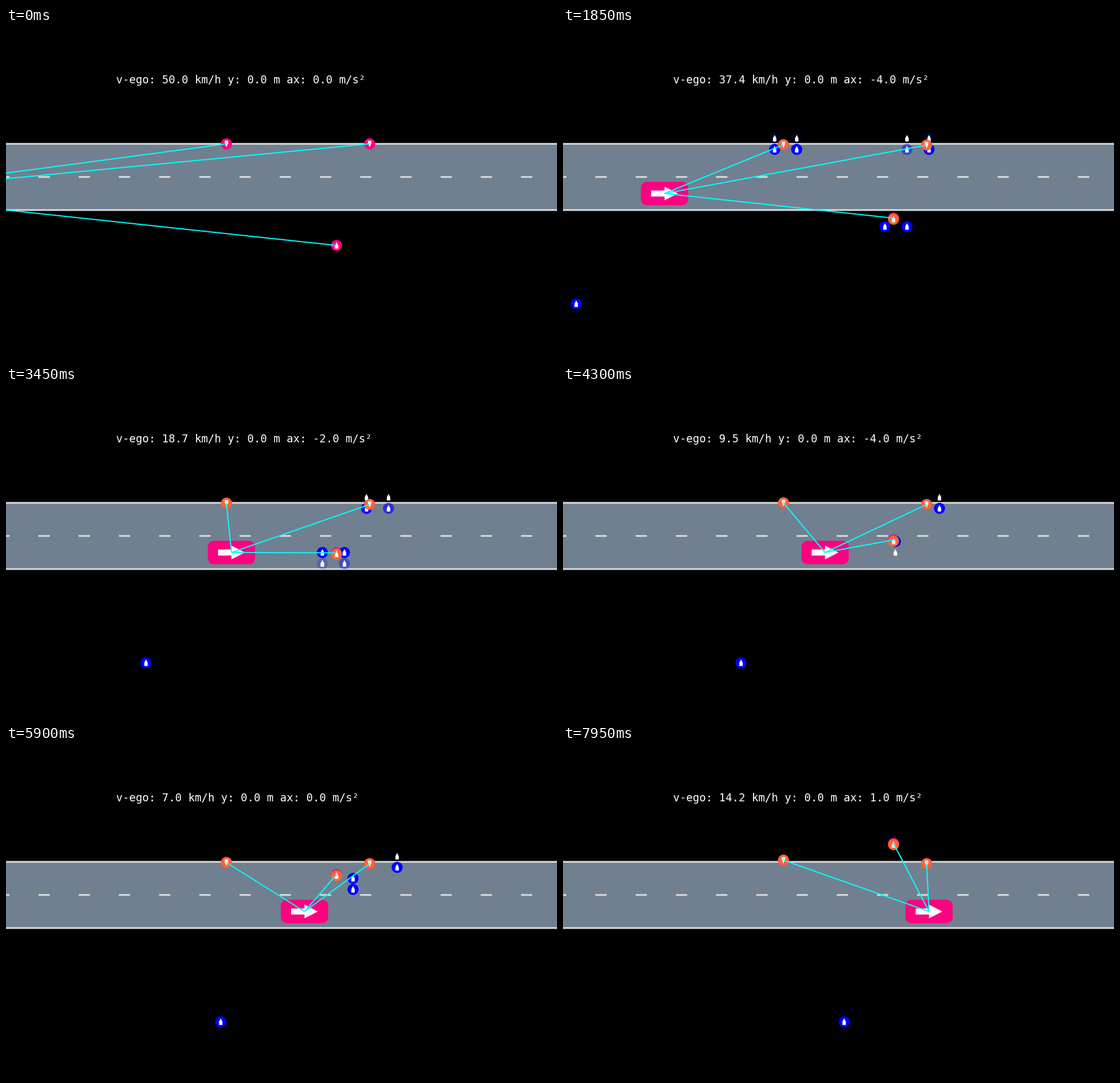
Write a matplotlib script that moves like this. It is 966x580 px and loops after 8000 ms.

```python
import numpy as np
import matplotlib.pyplot as plt
from matplotlib.animation import FuncAnimation
from matplotlib.patches import Circle, FancyBboxPatch, Polygon, Rectangle

W, H, DPI = 966, 580, 100
PX = 72 / DPI            # points per pixel
S = 19.33                # pixels per metre
DT = 0.05
FRAMES = 160
EGO_Y = 290
PINK, ORANGE, BLUE = "#ff0080", "#ff6a33", "#0000ff"
CYAN, PAINT, ASPHALT = "#00ffff", "#dcdcdc", "#708090"

# Driving phases of the car: (acceleration in m/s^2, steps)
PHASES = [(0, 16), (-2, 5), (-4, 15), (-8, 3), (-4, 8), (0, 4), (-2, 1),
          (-4, 7), (-2, 16), (-1, 1), (-4, 10), (0, 4), (-1, 10),
          (0, 18), (1, 40)]
ACC = np.concatenate([[0.0]] + [np.full(n, float(a)) for a, n in PHASES])
VEL = 50 / 3.6 + np.cumsum(ACC) * DT
STEP = (VEL + ACC * DT) * DT * S
POS = -270 + np.cumsum(STEP) - STEP[0]

fig = plt.figure(figsize=(W / DPI, H / DPI), dpi=DPI, facecolor="black")
ax = fig.add_axes([0, 0, 1, 1])
ax.set_xlim(0, W)
ax.set_ylim(H, 0)
ax.axis("off")
live = []


def stroke(xs, ys, color, width, z, cap="butt"):
    return ax.plot(xs, ys, color=color, lw=width * PX, zorder=z,
                   solid_capstyle=cap, snap=False)


def add(patch, z):
    patch.set_zorder(z)
    live.append(ax.add_patch(patch))


def disc(x, y, color, z, alpha=1.0):
    add(Circle((x, y), 9.7, fc=color, lw=0, alpha=alpha), z)


def shape(x, y, pts, z, alpha=1.0):
    add(Polygon([(x + a, y + b) for a, b in pts], fc="white", lw=0,
                alpha=alpha), z)


def pointer(x, y, z, up=1, tip=3.0, alpha=1.0):
    half = [(3, 5.5), (3, -0.3), (tip, -0.3), (0, -6)]
    pts = half + [(-a, b) for a, b in half[::-1]]
    shape(x, y, [(a, up * b) for a, b in pts], z, alpha)


def cell(x, y, alpha):
    if alpha > 0.02:
        disc(x, y, BLUE, 4, min(1, alpha))
    pointer(x, y, 4.1)


def draw_ego(x):
    add(FancyBboxPatch((x - 29.5, EGO_Y - 8.5), 59, 17,
                       boxstyle="round,pad=12", fc=PINK, lw=0), 2)
    half = [(-23.5, 5.3), (0, 5.3), (0, 12), (23.5, 0)]
    shape(x, EGO_Y, half + [(a, -b) for a, b in half[::-1]], 2.1)


def draw_cells(x, y, grid, t, crossing):
    """Occupied cells (2 m by 1 m) around a walker, in the frame of the car."""
    slow = t > 4
    drift = max(0, 8 * (t - 4.3))
    u = (x + drift - grid) / S / 2 - 0.25
    v = (EGO_Y - y) / S
    c, r = int(np.floor(u)), int(np.floor(v))
    fx, fy = u - c, v - r
    cols = [(c + 1, 1)] if slow else [(c, 1 - fx), (c + 1, fx)]
    rows = [(r, 1 - fy), (r + 1, fy)]
    fade = 1 if crossing else np.exp(-(t / 1.5) ** 4)

    for n, wx in cols:
        cx = grid + (2 * n + 0.5) * S
        for (m, wy), gain in zip(rows, (1, fade)):
            if wy > 0.2:
                cell(cx, EGO_Y - m * S, 10 * wx * (wy - 0.2) * gain)
    if crossing and 2 < t < 5:       # trail behind the crossing walker
        cell(grid + (2 * cols[0][0] + 0.5) * S,
             EGO_Y - (round(v) - 1) * S, 0)


def walkers(t, k):
    """Positions (x, y, heading up) of the three walkers."""
    sway = 1.6 * np.sin(np.pi * t / 4.4) ** 2 - 1.75 * max(0, t - 6)
    settle = 3.2 * (1 - np.exp(-t / 1.6))
    return [(386.5, 203 + sway, -1), (637.5, 203 + settle, -1),
            (579.5, 381 - 26.6 * k * DT, 1)]


def draw(i):
    while live:
        live.pop().remove()
    k = max(0, i - 1)
    t = i * DT
    ego, grid = POS[k], POS[max(0, k - 1)]
    label.set_text(f"v-ego: {VEL[k] * 3.6:.1f} km/h y: 0.0 m "
                   f"ax: {ACC[k]:.1f} m/s²")
    draw_ego(ego)
    if k:
        cell(grid - 7.5 * S, EGO_Y + 10 * S, 1)

    for x, y, up in walkers(t, k):
        crossing = up > 0
        disc(x, y, PINK, 3)
        pointer(x, y, 3.1, up, 2.3)
        if k:
            lag = 8 - 7.5 * np.cos(2 * np.pi * (t - 0.8) / 3.2)
            if x - ego > 2.5 * S:
                draw_cells(x, y + lag * crossing, grid, t, crossing)
            seen = y + 2 * crossing
            disc(x, seen, ORANGE, 5, 0.93)
            pointer(x, seen, 5.1, up, 2.3, 0.9)
        live.extend(stroke([ego, x], [EGO_Y, y], CYAN, 2, 6))
    return live


# Road
ax.add_patch(Rectangle((-5, 203), W + 10, 116, fc=ASPHALT, lw=0, zorder=0))
for edge in (203, 319):
    stroke([-5, W + 5], [edge, edge], PAINT, 3, 1)
for n in range(-1, 13):
    left = 58 + 70.5 * n
    stroke([left, left + 17.5], [261, 261], PAINT, 3, 1, "round")
label = ax.text(192.7, 97, "", color="white", size=19.2 * PX,
                family="DejaVu Sans Mono", va="baseline", zorder=9)

anim = FuncAnimation(fig, draw, frames=FRAMES, interval=50, repeat=True,
                     repeat_delay=0, init_func=lambda: draw(0), blit=False)
plt.show()
```
